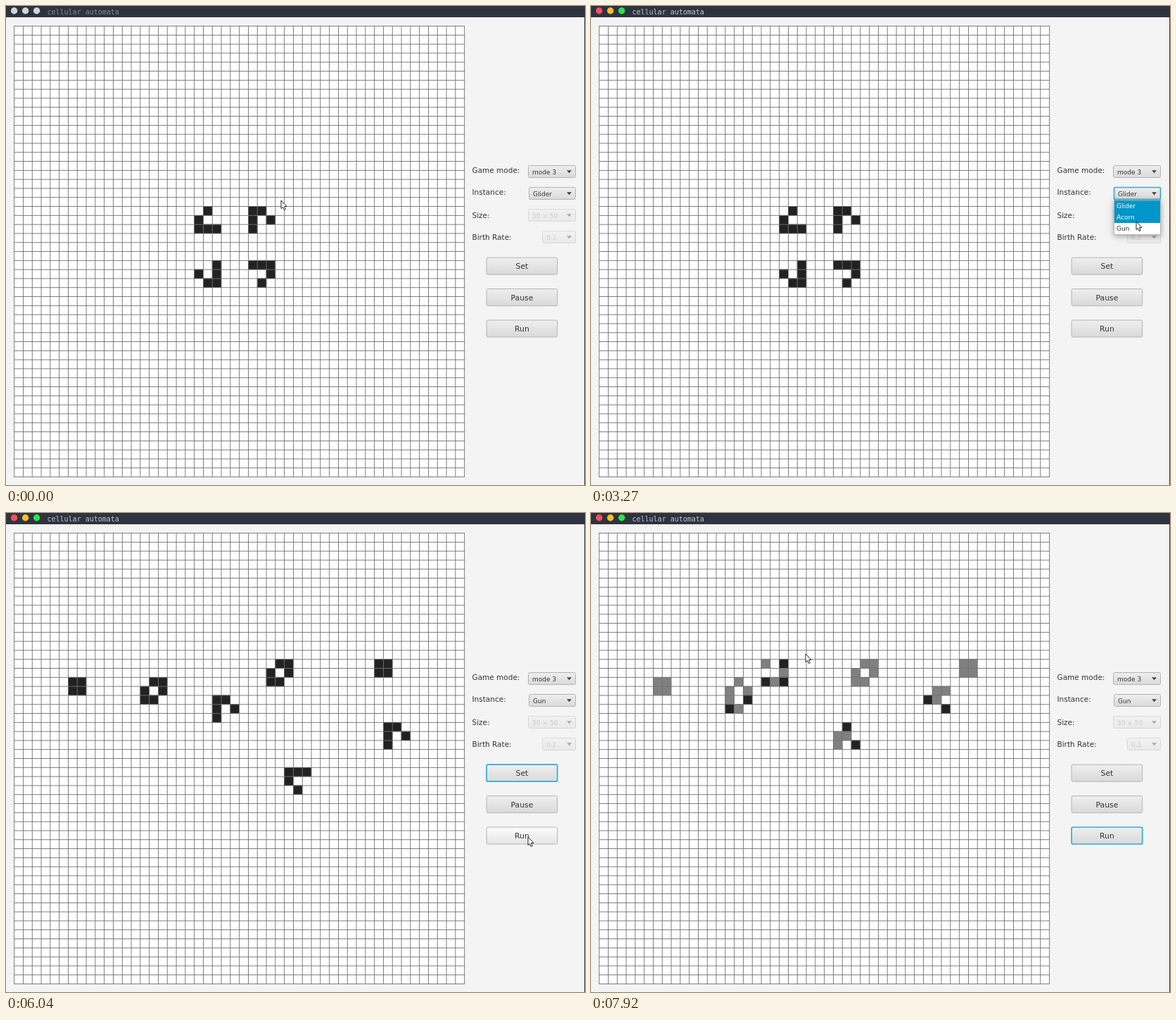
Write an HTML page with a canvas that moves like this. It is 823x680 px and loops after 8 s.

```html
<!DOCTYPE html>
<html lang="en">
<head>
<meta charset="utf-8">
<title>cellular automata</title>
<style>
  html, body { margin: 0; width: 823px; height: 680px; overflow: hidden; background: #f4f4f4; }
  canvas { display: block; }
</style>
</head>
<body>
<canvas id="stage" width="823" height="680"></canvas>
<script>
const ctx = document.getElementById('stage').getContext('2d');
const LOOP = 8000, SIZE = 50, PITCH = 12.8, LEFT = 11.2, TOP = 28.1;
const SANS = '"DejaVu Sans", sans-serif', MONO = '"DejaVu Sans Mono", monospace';

// Moments of the session, in ms
const ACTIVATE = 185, LEAVE = 1000, RETURN = 2420, OPEN = 2770, CHOOSE = 3810,
  PRESS = 5080, SET = 5190, RUN = 6230, GENERATION = 100;

// Pointer moves: [first step, last step, x, y], stepping about every REFRESH ms
const REFRESH = 115, START = [391, 276];
const moves = [
  [120, 380, 404, 289], [580, 770, 840, 298], [LEAVE, LEAVE, 816, 250], [RETURN, RETURN, 775, 266],
  [3150, 3270, 775, 306], [3380, 3650, 760, 310], [4150, 4650, 747, 370], [5690, 6040, 742, 460],
  [6380, 6500, 683, 517], [6650, 6770, 586, 492], [6960, 7080, 574, 485], [7540, 7920, 305, 200]
];

function pointerAt(t) {
  let [x, y] = START;
  for (const [from, to, endX, endY] of moves) {
    if (t < from) break;
    const gaps = Math.round((to - from) / REFRESH);
    const done = t >= to ? 1 : (Math.floor((t - from) / (to - from) * gaps) + 1) / (gaps + 1);
    x += (endX - x) * done;
    y += (endY - y) * done;
  }
  return [x, y];
}

// Cell values: 0 dead, 1 newborn, 2 survivor
function seed(parts) {
  const cells = new Uint8Array(SIZE * SIZE);
  for (const [x, y, rows] of parts)
    rows.split('/').forEach((row, j) => [...row].forEach((ch, i) => {
      if (ch === 'o') cells[(y + j) * SIZE + x + i] = 1;
    }));
  return cells;
}

function step(cells) {
  const next = new Uint8Array(cells.length);
  const alive = (x, y) => x >= 0 && y >= 0 && x < SIZE && y < SIZE && cells[y * SIZE + x] ? 1 : 0;
  for (let y = 0; y < SIZE; y++) for (let x = 0; x < SIZE; x++) {
    const self = alive(x, y);
    let n = -self;
    for (let j = -1; j < 2; j++) for (let i = -1; i < 2; i++) n += alive(x + i, y + j);
    if (n === 3 || (self && n === 2)) next[y * SIZE + x] = self ? 2 : 1;
  }
  return next;
}

const BLOCK = 'oo/oo', SHIP = '.oo/o.o/oo.', GLIDER = 'oo./o.o/o..', WEDGE = '.o./o../ooo';
const halfTurn = rows => [...rows].reverse().join('');

const gliders = seed([
  [20, 20, WEDGE], [26, 20, GLIDER], [20, 26, halfTurn(GLIDER)], [26, 26, halfTurn(WEDGE)]
]);
const gun = [seed([
  [6, 16, BLOCK], [14, 16, SHIP], [22, 18, GLIDER], [28, 14, SHIP],
  [40, 14, BLOCK], [41, 21, GLIDER], [30, 26, 'ooo/o../.o.']
])];
for (let i = 0; i < LOOP - RUN; i += GENERATION) gun.push(step(gun.at(-1)));

function rect(x, y, w, h, color) {
  ctx.fillStyle = color;
  ctx.fillRect(x, y, w, h);
}

function text(str, x, y, size, color = '#333', font = SANS, align = 'left') {
  ctx.font = size + 'px ' + font;
  ctx.textAlign = align;
  ctx.fillStyle = color;
  ctx.fillText(str, x, y);
}

function shape(points, fill, stroke) {
  ctx.beginPath();
  points.forEach(([x, y]) => ctx.lineTo(x, y));
  ctx.closePath();
  ctx.fillStyle = fill;
  ctx.fill();
  if (stroke) {
    ctx.strokeStyle = stroke;
    ctx.lineWidth = 1;
    ctx.stroke();
  }
}

function grid(cells) {
  const span = SIZE * PITCH;
  rect(LEFT, TOP, span, span, '#fff');
  cells.forEach((v, k) => {
    if (!v) return;
    const x = LEFT + PITCH * (k % SIZE), y = TOP + PITCH * Math.floor(k / SIZE);
    rect(x, y, PITCH + .5, PITCH + .5, v === 1 ? '#222' : '#808080');
  });
  for (let i = 0; i <= SIZE; i++) {
    rect(LEFT + PITCH * i, TOP, .9, span + .9, '#707070');
    rect(LEFT, TOP + PITCH * i, span + .9, .9, '#707070');
  }
}

function panel(x, y, w, h, { focus, hover }) {
  const shade = ctx.createLinearGradient(0, y, 0, y + h);
  shade.addColorStop(0, hover ? '#fcfcfc' : '#efefef');
  shade.addColorStop(1, hover ? '#e5e5e5' : '#d9d9d9');
  ctx.beginPath();
  ctx.roundRect(x + .5, y + .5, w - 1, h - 1, 2);
  ctx.fillStyle = shade;
  ctx.fill();
  ctx.strokeStyle = focus ? '#35acd3' : '#b4b4b4';
  ctx.lineWidth = focus ? 1.7 : 1;
  ctx.stroke();
}

function combo(label, x, y, w, h, state = {}) {
  ctx.globalAlpha = state.disabled ? .4 : 1;
  panel(x, y, w, h, state);
  const mid = y + h / 2, ax = x + w - 9.5;
  text(label, x + 6, mid + 3.5, 9, state.disabled ? '#999' : '#333');
  shape([[ax - 3.5, mid - 1.7], [ax + 3.5, mid - 1.7], [ax, mid + 2.3]], '#444');
  ctx.globalAlpha = 1;
}

function popup(py) {
  ctx.save();
  ctx.shadowColor = 'rgba(0,0,0,.35)';
  ctx.shadowBlur = 8;
  ctx.shadowOffsetY = 2;
  rect(743, 275, 67, 50, '#b8b8b8');
  ctx.restore();
  rect(744, 276, 65, 48, '#fff');
  const over = Math.max(0, Math.min(2, Math.floor((py - 275.5) / 16)));
  ['Glider', 'Acorn', 'Gun'].forEach((name, i) => {
    const lit = i === 0 || i === over;
    if (lit) rect(744, 276 + 16 * i, 65, 16, '#0096c9');
    text(name, 747, 287 + 16 * i, 9, lit ? '#fff' : '#333');
  });
}

function titleBar(active) {
  rect(0, 0, 823, 16, '#2f3340');
  ['#fc4f58', '#fdbd2e', '#2ae54b'].forEach((color, i) => {
    ctx.beginPath();
    ctx.arc(11.6 + 16 * i, 6.8, 4.7, 0, 2 * Math.PI);
    ctx.fillStyle = active ? color : '#d4d4d4';
    ctx.fill();
  });
  text('cellular automata', 58.5, 11.5, 10, active ? '#c3c6cd' : '#85888e', MONO);
}

function drawPointer(x, y, resizing) {
  const arrow = [[0, 0], [0, 11.6], [2.5, 9.3], [4.4, 13.6], [6.4, 12.7], [4.6, 8.6], [8, 8.4]];
  const cross = [[3.5, 1], [6, 1], [6, 5], [9, 5], [9, 8], [6, 8], [6, 11.5], [3.5, 11.5],
    [3.5, 8], [.5, 8], [.5, 5], [3.5, 5]];
  shape((resizing ? cross : arrow).map(([i, j]) => [x + i, y + j]), '#fff', '#222');
}

function draw(t) {
  const [px, py] = pointerAt(t);
  const active = t >= ACTIVATE, open = t >= OPEN && t < CHOOSE;
  const focus = !active ? '' : t < PRESS ? 'Instance' : t < RUN ? 'Set' : 'Run';
  const state = (name, x, y, w, h) => ({
    focus: focus === name,
    hover: !open && focus !== name && px >= x && px < x + w && py >= y && py < y + h
  });

  rect(0, 0, 823, 680, '#f4f4f4');
  rect(822, 16, 1, 664, '#3a3d47');
  titleBar(active);
  const age = t < RUN ? 0 : Math.floor((t - RUN) / GENERATION) + 1;
  grid(t < SET ? gliders : gun[age]);

  text('Game mode:', 662.5, 237, 10.5);
  text('Instance:', 662.5, 268, 10.5);
  text('Size:', 662.5, 301, 10.5);
  text('Birth Rate:', 662.5, 332, 10.5);
  combo('mode 3', 742, 226, 68, 18);
  combo(t < CHOOSE ? 'Glider' : 'Gun', 743, 257, 67, 18, state('Instance', 743, 257, 67, 18));
  combo('50 × 50', 742, 288, 68, 18, { disabled: true });
  combo('0.2', 762, 319, 48, 18, { disabled: true });

  ['Set', 'Pause', 'Run'].forEach((name, i) => {
    const box = [682.6, 356.7 + 44.4 * i, 101.6, 25];
    panel(...box, state(name, ...box));
    text(name, 733.4, box[1] + 16.4, 10.8, '#333', SANS, 'center');
  });

  if (open) popup(py);
  drawPointer(px, py, t >= LEAVE && t < RETURN);
}

function tick() {
  draw(performance.now() % LOOP);
  requestAnimationFrame(tick);
}
tick();
</script>
</body>
</html>
```
